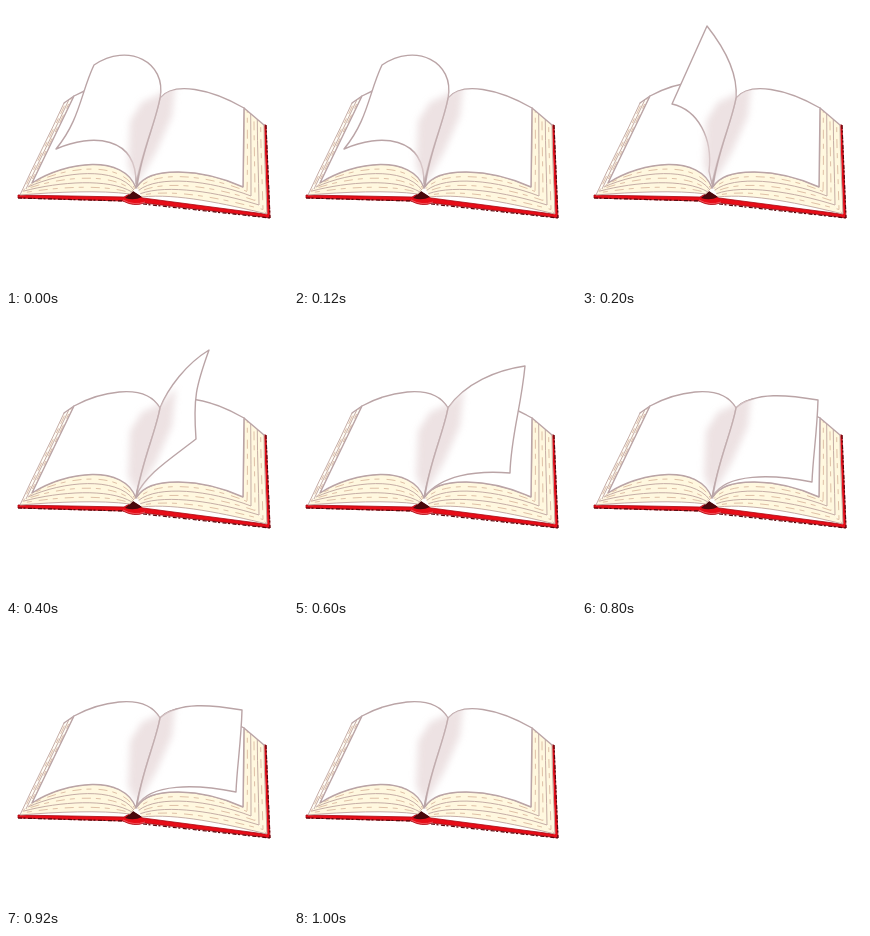
Write an HTML page that moves like this. It is 282 by 282 pixels and loops after 1200 ms.

```html
<!DOCTYPE html>
<html>
<head>
<meta charset="utf-8">
<style>
html, body { margin: 0; height: 100%; overflow: hidden; background: #fff; }
svg { display: block; width: 100vw; height: 100vh; }
.line { fill: none; stroke: #baa4a6; stroke-width: 1.4; stroke-linejoin: round; stroke-linecap: round; }
.paper { fill: #fff; stroke: #baa4a6; stroke-width: 1.4; stroke-linejoin: round; }
.cream { fill: #fff8df; }
.leaf { fill: none; stroke: #bfa49f; stroke-width: .9; }
.dash { fill: none; stroke: #dcb9a0; stroke-width: .9; stroke-dasharray: 9 5 5 7; }
.cover { fill: #e80d18; stroke: #a80812; stroke-width: .8; }
.rough { fill: none; stroke: #5c050b; stroke-width: 1.2; stroke-dasharray: 4 1.5 2 2.5; }
</style>
</head>
<body>
<svg viewBox="0 0 282 282">
  <defs>
    <filter id="soft" x="-30%" y="-30%" width="160%" height="160%"><feGaussianBlur stdDeviation="3.5"/></filter>
    <clipPath id="pages">
      <path d="M68 90C90 78 138 64 154 92C150 115 136 145 130 182C118 148 60 155 26 177Z"/>
      <path d="M154 92C168 75 205 83 238 102L237 181C195 162 143 160 131 181C136 145 150 115 154 92Z"/>
      <path class="turn"/>
    </clipPath>
  </defs>

  <path class="cover" d="M12 189L118 191L127 186L137 192L259 208L257 119L260 119L264 212L250 210L138 197Q128 201 117 195L12 192Z"/>
  <path class="rough" d="M12 192L118 195M137 198L200 205L264 212M260 119L262 165L264 212"/>
  <path d="M119 192L127 185L136 191Q128 195 119 192Z" fill="#4a080c"/>
  <path d="M117 194Q128 200 139 196" fill="none" stroke="#f0525a" stroke-width="1"/>

  <path class="cream" d="M26 177C60 155 118 148 130 182L124 188C95 184 50 186 14 189Z"/>
  <path class="cream" d="M131 181C143 160 195 162 237 181L261 208C220 198 170 187 136 191Z"/>
  <path class="cream" d="M238 102L258 119L261 208L237 181Z"/>
  <path fill="#fffdf6" d="M68 90L58 97L14 189L26 177Z"/>
  <g id="leaves"></g>
  <path class="line" d="M68 90L58 97M238 102L258 119"/>

  <path class="paper" d="M68 90C90 78 138 64 154 92C150 115 136 145 130 182C118 148 60 155 26 177Z"/>
  <path class="paper" d="M154 92C168 75 205 83 238 102L237 181C195 162 143 160 131 181C136 145 150 115 154 92Z"/>
  <path class="paper turn"/>
  <g clip-path="url(#pages)">
    <path filter="url(#soft)" fill="#e6d7d8" opacity=".72"
      d="M154 88L170 72L166 110L150 146L131 178L122 160L124 115L136 96Z"/>
  </g>
  <path class="line" stroke-opacity=".7" d="M154 92C150 115 136 145 130 182"/>
</svg>
<script>
const leaves = document.getElementById('leaves');

// Draw leaf edges evenly between two cubic curves.
function stack(a, b, count) {
  for (let i = 0; i <= count; i++) {
    const p = a.map((v, k) => (v + (b[k] - v) * i / count).toFixed(1));
    const path = document.createElementNS('http://www.w3.org/2000/svg', 'path');
    path.setAttribute('d', `M${p.slice(0, 2)}C${p.slice(2)}`);
    path.setAttribute('class', i % 2 ? 'dash' : 'leaf');
    path.setAttribute('stroke-dashoffset', i * 7);
    leaves.append(path);
  }
}
stack([26, 177, 60, 155, 118, 148, 130, 182], [14, 189, 50, 186, 95, 184, 124, 188], 6);
stack([131, 181, 143, 160, 195, 162, 237, 181], [136, 191, 170, 187, 220, 198, 261, 208], 6);
stack([238, 102, 238, 128, 238, 155, 237, 181], [258, 119, 258, 148, 260, 178, 261, 208], 6);
stack([68, 90, 55, 118, 40, 148, 26, 177], [58, 97, 44, 128, 28, 158, 14, 189], 4);

// Turning page: top edge, free edge, bottom edge, then back up the spine.
const spine = 'C136 145 150 115 154 92Z';
const poses = [
  'M154 92C161 56 122 36 88 59C75 86 74 114 50 143C86 127 131 130 130 178',
  'M154 92C156 68 144 44 125 20Q109 56 90 98C116 104 131 132 127 165L130 178',
  'M154 92C162 72 180 48 203 34C190 70 187 82 190 123C163 144 140 158 130 180',
  'M154 92C171 67 203 54 231 50C227 92 217 120 216 157C180 154 147 160 131 180',
  'M154 92C173 75 207 79 236 84C235 118 231 140 230 166C190 158 144 157 131 180',
  ''
];
const turns = document.querySelectorAll('.turn');
let shown;

function draw(now) {
  const pose = poses[Math.floor(now % 1200 / 200)];
  if (pose !== shown) {
    shown = pose;
    turns.forEach(el => el.setAttribute('d', pose && pose + spine));
  }
  requestAnimationFrame(draw);
}
draw(performance.now());
</script>
</body>
</html>
```
